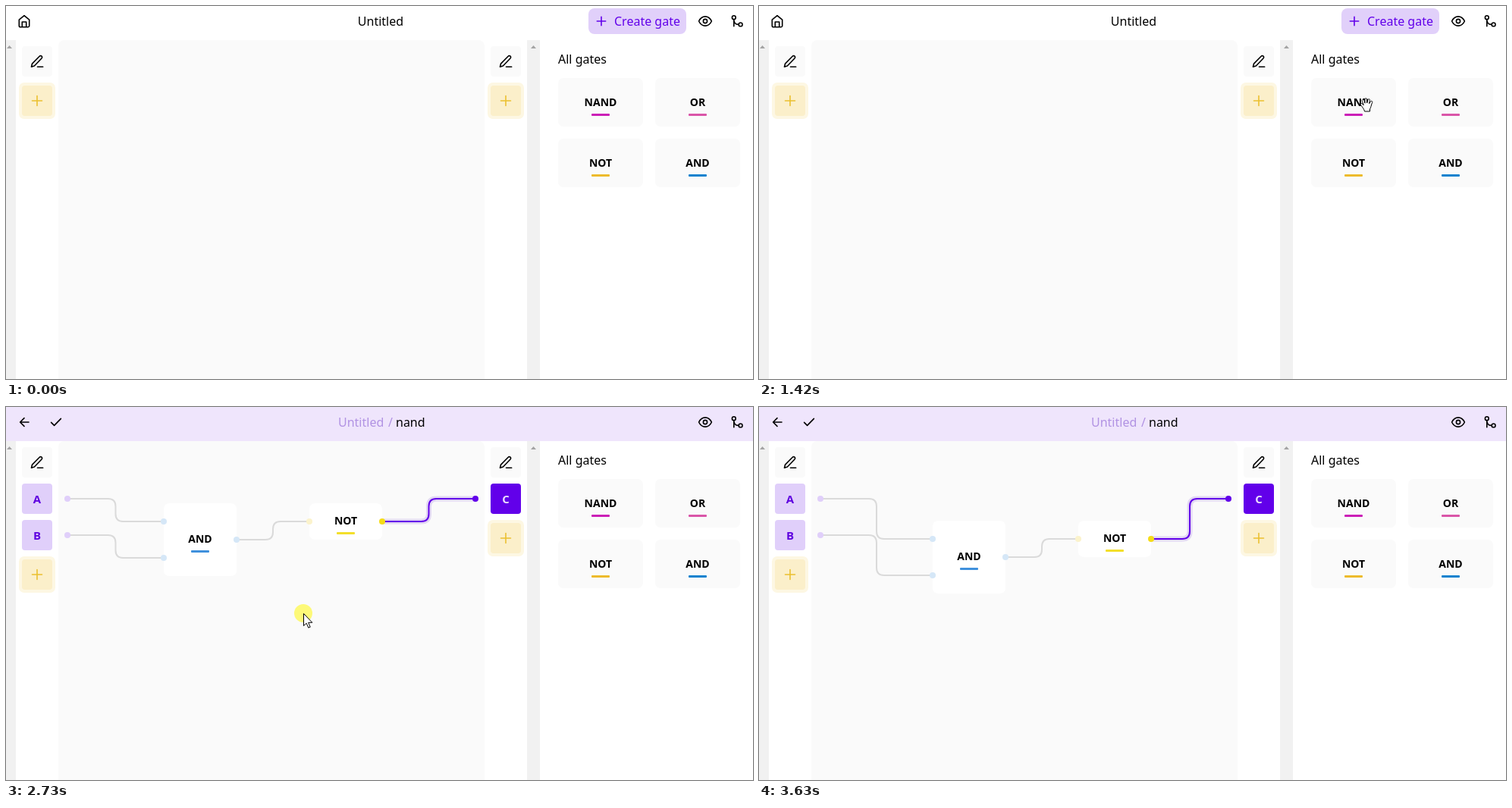
These frames come from a looping animation (985x492 px, 4160 ms). An HTML page:

```html
<!DOCTYPE html>
<html lang="en">
<head>
<meta charset="utf-8">
<title>Gate editor</title>
<style>
  html, body { margin: 0; width: 100%; height: 100%; overflow: hidden; background: #fff; }
  svg { display: block; width: 985px; height: 492px; }
  text { font: 400 16px Ubuntu, "Noto Sans", sans-serif; fill: #000; }
  .label { font-size: 14px; font-weight: 600; text-anchor: middle; }
  .icon { fill: none; stroke: #000; stroke-width: 1.6; stroke-linecap: round; stroke-linejoin: round; }
  .wire { fill: none; stroke: #dadada; stroke-width: 2; }
  .glow { fill: none; stroke: #e2d8f3; stroke-width: 7; stroke-linecap: round; }
  .live { fill: none; stroke: #6200ea; stroke-width: 2; }
  .cursor { fill: #fff; stroke: #000; stroke-width: 1; stroke-linejoin: round; }
</style>
</head>
<body>
<svg viewBox="0 0 985 492">
  <defs>
    <g id="pencil">
      <rect width="40" height="40" rx="4" fill="#fafafa"/>
      <path class="icon" d="M12.5 27.3l1-4.2L23.2 13.2a1.9 1.9 0 0 1 2.8 0 1.9 1.9 0 0 1 0 2.8L16.4 26Z M20.5 27.3h7.2"/>
    </g>
    <g id="add">
      <rect x="-4" y="-4" width="48" height="48" rx="7" fill="#fdf7e3"/>
      <rect width="40" height="40" rx="4" fill="#fbefca"/>
      <path class="icon" d="M13.5 20h13M20 13.5v13" style="stroke:#ebc02f"/>
    </g>
  </defs>

  <rect width="985" height="492" fill="#fff"/>
  <rect y="45" width="13" height="447" fill="#f1f1f1"/>
  <rect x="687" y="45" width="17" height="447" fill="#f1f1f1"/>
  <path d="M1 56l3.5-4 3.5 4ZM692 56l3.5-4 3.5 4Z" fill="#a3a3a3"/>
  <rect x="69" y="45" width="562" height="470" rx="8" fill="#fafafa"/>
  <use href="#pencil" x="21" y="53"/>
  <use href="#pencil" x="639" y="53"/>
  <text x="728" y="76">All gates</text>
  <g id="cards"></g>

  <g id="home">
    <path class="icon" d="M17.3 18.2L24 12.6l6.7 5.6v7.8a1.8 1.8 0 0 1-1.8 1.8h-9.8a1.8 1.8 0 0 1-1.8-1.8ZM21.3 27.6v-6.6h5.4v6.6"/>
    <text x="494" y="26" text-anchor="middle">Untitled</text>
    <rect x="768" y="3" width="129" height="34" rx="8" fill="#e1d0fa"/>
    <path class="icon" d="M779.3 20h11.4M785 14.3v11.4" style="stroke:#6200ea"/>
    <text x="802" y="26" style="fill:#6200ea">Create gate</text>
    <use href="#add" x="21" y="105"/>
    <use href="#add" x="639" y="105"/>
  </g>

  <g id="edit">
    <rect width="985" height="45" fill="#efe5fc"/>
    <path class="icon" d="M30 20H18.7M24 14.6L18.6 20l5.4 5.4M59.6 20.4l4 4L72.4 15.4"/>
    <text x="438" y="26" style="fill:#b192e3">Untitled</text>
    <text x="504" y="26" style="fill:#b192e3">/</text>
    <text x="514" y="26">nand</text>
    <g id="pins"></g>
    <use href="#add" x="21" y="201"/>
    <use href="#add" x="639" y="153"/>
    <path id="glow" class="glow"/>
    <path id="grey" class="wire"/>
    <path id="live" class="live"/>
    <g fill="#e0cffa"><circle cx="81" cy="121" r="4"/><circle cx="81" cy="169" r="4"/></g>
    <circle cx="619" cy="121" r="4" fill="#6200ea"/>
    <g id="gates"></g>
  </g>

  <g class="icon">
    <path d="M913.6 20C917.5 11.8 926.5 11.8 930.4 20 926.5 28.2 917.5 28.2 913.6 20Z"/>
    <circle cx="922" cy="20" r="2.6"/>
    <circle cx="959.8" cy="15.2" r="2.4"/>
    <circle cx="968.6" cy="24.4" r="2.4"/>
    <path d="M959.8 17.8v9M959.8 18c0 4.4 2 6.4 6 6.4"/>
  </g>

  <g id="pointer">
    <circle id="press" r="12" fill="#fdf978"/>
    <path id="arrow" class="cursor" d="M.5.5V16.6L4.2 13.2 6.8 19.2 9.2 18.2 6.7 12.3H11.8Z"/>
    <path id="hand" class="cursor" d="M-2.5 9C-3 6-6 2.5-7.5.8-8.7-1-6.5-2.2-5.3-1L-3.8.8-5.6-4.6C-6.2-6.8-3.8-7.4-3.2-5.5L-2-1.8V-6.8C-2-8.8.5-8.8.5-6.8L.7-2 2-6.2C2.6-8.1 4.8-7.4 4.4-5.6L3.6-1.3 5.4-4C6.5-5.5 8.4-4.3 7.6-2.6 6 1 6 4 4.5 6V9Z"/>
  </g>
</svg>

<script>
const LOOP = 4160, STEP = 70;
const $ = id => document.getElementById(id);

// time, x, y
const pointerKeys = [
  [260, 873, 380], [330, 868, 345], [470, 848, 250], [610, 819, 165], [680, 814, 149],
  [870, 814, 149], [940, 811, 144], [1010, 805, 136], [1080, 801, 130],
  [1820, 801, 130], [1890, 780, 134], [1960, 700, 150], [2030, 560, 180], [2100, 395, 212],
  [2170, 255, 232], [2240, 165, 240], [2310, 135, 242], [2380, 128, 242], [2450, 136, 242],
  [2520, 215, 244], [2590, 300, 250], [2660, 360, 262], [2730, 392, 272],
  [2940, 403, 279], [3150, 399, 281], [3290, 404, 285], [3420, 413, 290],
  [3490, 415, 291], [3560, 636, 419]
];
const dragKeys = [
  [2450, 0, 0], [2520, 5, 3], [2590, 14, 9], [2660, 28, 19], [2730, 43, 30],
  [2870, 72, 50], [2940, 79, 55], [3150, 76, 53], [3490, 64, 53]
];
const presses = [[1220, 1290], [1350, 1420], [2450, 3420]];
const within = (v, a, b) => v >= a && v < b;

function sample(keys, t) {
  const i = keys.findIndex(k => k[0] > t);
  if (i < 0) return keys[keys.length - 1].slice(1);
  if (i === 0) return keys[0].slice(1);
  const [t0, x0, y0] = keys[i - 1], [t1, x1, y1] = keys[i];
  const p = Math.floor((t - t0) / STEP) * STEP / (t1 - t0);
  return [Math.round(x0 + (x1 - x0) * p), Math.round(y0 + (y1 - y0) * p)];
}

function wire(x0, y0, x1, y1) {
  const m = (x0 + x1) / 2, dy = y1 - y0;
  const r = Math.min(10, Math.abs(dy) / 2), s = Math.sign(dy) * r;
  return `M${x0} ${y0}H${m - r}Q${m} ${y0} ${m} ${y0 + s}V${y1 - s}Q${m} ${y1} ${m + r} ${y1}H${x1}`;
}

const block = (x, y, w, h, fill, name, bar, cy) =>
  `<rect x="${x}" y="${y}" width="${w}" height="${h}" rx="7" fill="${fill}"/>
   <text class="label" x="${x + w / 2}" y="${cy + 5}">${name}</text>
   <rect x="${x + w / 2 - 12}" y="${cy + 15}" width="24" height="3" rx="1" fill="${bar}"/>`;
const dot = (x, y, fill) => `<circle cx="${x}" cy="${y}" r="4" fill="${fill}"/>`;
const pin = (x, y, name, fill, ink) =>
  `<rect x="${x}" y="${y}" width="40" height="40" rx="4" fill="${fill}"/>
   <text class="label" x="${x + 20}" y="${y + 25.5}" style="font-size:15px;fill:${ink}">${name}</text>`;

const cards = [
  [728, 95, 'NAND', '#cb1fb7'], [856, 95, 'OR', '#da55a8'],
  [728, 175, 'NOT', '#edbb2c'], [856, 175, 'AND', '#0f82cf']
];
$('cards').innerHTML = cards.map(([x, y, name, bar]) =>
  block(x, y, 112, 64, '#fafafa', name, bar, y + 32)).join('');
$('pins').innerHTML = pin(21, 101, 'A', '#e0cffa', '#5f00e0') +
  pin(21, 149, 'B', '#e0cffa', '#5f00e0') + pin(639, 101, 'C', '#6200ea', '#ecdffc');
$('gates').innerHTML =
  block(165, 97, 96, 96, '#fff', 'AND', '#3f90dc', 144) +
  block(357, 97, 96, 48, '#fff', 'NOT', '#f3df2b', 120) +
  dot(165, 121, '#d5e7f7') + dot(165, 169, '#d5e7f7') + dot(261, 145, '#d5e7f7') +
  dot(357, 121, '#fbf3cc') + dot(453, 121, '#f5dc18');

const show = (id, on) => $(id).setAttribute('visibility', on ? 'visible' : 'hidden');
const move = (id, x, y) => $(id).setAttribute('transform', `translate(${x} ${y})`);

function draw(t) {
  const editing = t >= 1490;
  $('home').style.display = editing ? 'none' : '';
  $('edit').style.display = editing ? '' : 'none';

  const [dx, dy] = sample(dragKeys, t);
  move('gates', dx, dy);
  $('grey').setAttribute('d',
    wire(81, 121, 165 + dx, 121 + dy) + wire(81, 169, 165 + dx, 169 + dy) +
    wire(261 + dx, 145 + dy, 357 + dx, 121 + dy));
  const out = wire(453 + dx, 121 + dy, 619, 121);
  $('glow').setAttribute('d', out);
  $('live').setAttribute('d', out);

  const [x, y] = sample(pointerKeys, t);
  const seen = within(t, 260, 3630);
  const grab = cards.some(c => within(x, c[0], c[0] + 112) && within(y, c[1], c[1] + 64));
  move('pointer', x, y);
  show('hand', seen && grab);
  show('arrow', seen && !grab);
  show('press', presses.some(([a, b]) => within(t, a, b)));
}

function tick() {
  draw(performance.now() % LOOP);
  requestAnimationFrame(tick);
}
tick();
</script>
</body>
</html>
```
